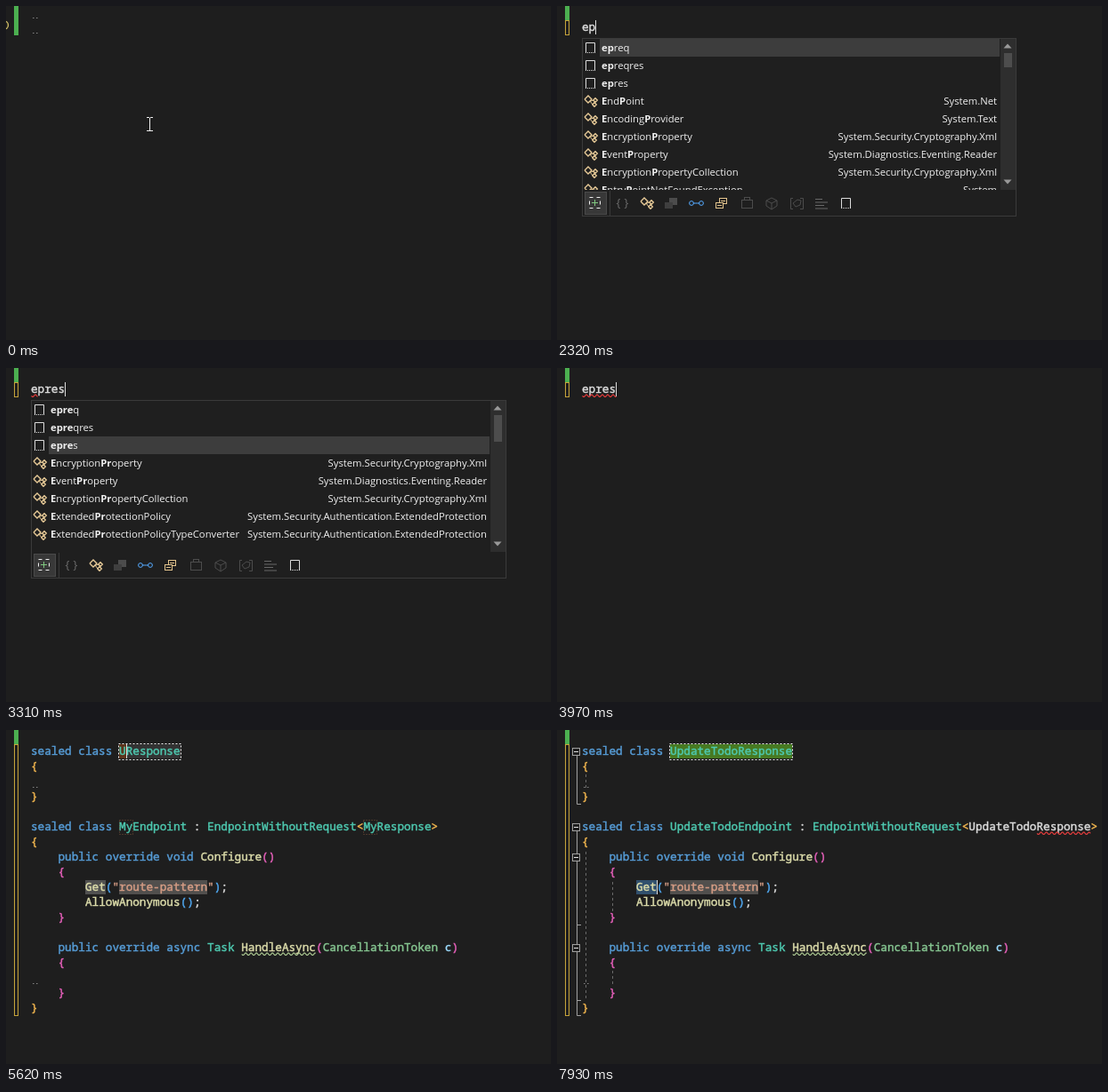
An HTML page with a canvas that plays this animation: 612 px wide and 376 px high, repeating every 8 s.

```html
<!DOCTYPE html>
<html lang="en">
<head>
<meta charset="utf-8">
<title>Snippet expansion</title>
<style>
html, body { margin: 0; width: 100%; height: 100%; overflow: hidden; background: #1e1e1e; }
canvas { display: block; }
</style>
</head>
<body>
<canvas id="stage" width="612" height="376"></canvas>
<script>
const ctx = document.getElementById('stage').getContext('2d');
const LEFT = 28, TOP = 16, ROW = 17, CHAR = 7.62;
const CODE_FONT = '12.7px "Noto Sans Mono", monospace';
const UI_FONT = '11.25px "Open Sans", sans-serif';
const COLORS = {
  k: '#569cd6', t: '#4ec9b0', m: '#dcdcaa', s: '#d69d85', w: '#dcdcdc',
  o: '#efb44e', p: '#e35fb8', b: '#4fa6ee', g: '#86c691', v: '#9cdcfe'
};
const colX = col => LEFT + col * CHAR;
const rowY = row => TOP + row * ROW;

function rect(x, y, w, h, color) {
  ctx.fillStyle = color;
  ctx.fillRect(x, y, w, h);
}

function frame(x, y, w, h, color, dash = []) {
  ctx.strokeStyle = color;
  ctx.lineWidth = 1;
  ctx.setLineDash(dash);
  ctx.strokeRect(x + .5, y + .5, w - 1, h - 1);
  ctx.setLineDash([]);
}

function line(points, color, dash = [], width = 1) {
  ctx.strokeStyle = color;
  ctx.lineWidth = width;
  ctx.setLineDash(dash);
  ctx.beginPath();
  points.forEach(([x, y]) => ctx.lineTo(x, y));
  ctx.stroke();
  ctx.setLineDash([]);
}

// Tokens are separated by "|"; the first letter of each picks its color.
// A thin stroke gives the text its medium weight.
function code(row, col, tokens) {
  ctx.font = CODE_FONT;
  ctx.textAlign = 'left';
  ctx.lineWidth = .45;
  for (const token of tokens.split('|')) {
    ctx.fillStyle = ctx.strokeStyle = COLORS[token[0]];
    const text = token.slice(2);
    ctx.fillText(text, colX(col), rowY(row) + 12);
    ctx.strokeText(text, colX(col), rowY(row) + 12);
    col += text.length;
  }
}

function caret(row, col) {
  rect(Math.round(colX(col)), rowY(row), 1, 16, '#dcdcdc');
}

function highlight(row, col, length, color) {
  rect(Math.round(colX(col)), rowY(row), Math.round(length * CHAR), ROW - 1, color);
}

function fieldOutline(row, col, length) {
  frame(Math.round(colX(col)), rowY(row), Math.round(length * CHAR) + 1, ROW, '#795038', [1, 2]);
}

function squiggle(row, col, length, color) {
  const points = [];
  for (let x = 0; x <= length * CHAR; x++)
    points.push([colX(col) + x + .5, rowY(row) + 15.3 + 1.3 * Math.sin(x * Math.PI / 3)]);
  line(points, color, [], 1.2);
}

function hintDots(row) {
  for (const x of [30, 34]) rect(x, rowY(row) + 14, 1.5, 1, '#858585');
}

function changeBar(savedTo, editedTo) {
  rect(9, 0, 5, savedTo, '#4caf50');
  if (editedTo) frame(9, savedTo, 5, editedTo - savedTo, '#c5a33b');
}

function ibeam(x, y) {
  rect(x, y + 1, 1, 15, '#eee');
  for (const edge of [y, y + 15]) {
    rect(x - 3, edge, 3, 1, '#eee');
    rect(x + 1, edge, 3, 1, '#eee');
  }
}

function snippetIcon(x, y) {
  const color = '#dcdcdc';
  line([[x - 4.5, y + 6], [x - 4.5, y - 5.5], [x + 5.5, y - 5.5], [x + 5.5, y + 6]], color);
  line([[x - 5, y + 5.5], [x + 6, y + 5.5]], color, [1, 1]);
}

function classIcon(x, y) {
  const diamond = (dx, dy, r) =>
    line([[x + dx - r, y + dy], [x + dx, y + dy - r], [x + dx + r, y + dy], [x + dx, y + dy + r], [x + dx - r, y + dy]],
      '#e8cb98', [], 1.4);
  diamond(-3, -2, 4);
  diamond(5, -1, 2.3);
  diamond(4, 4, 2.3);
  line([[x, y], [x + 3, y - 1]], '#e8cb98');
  line([[x - 1, y], [x + 2, y + 4]], '#e8cb98');
}

// Asterisks toggle bold.
function label(text, x, y) {
  ctx.textAlign = 'left';
  ctx.fillStyle = '#f0f0f0';
  text.split('*').forEach((part, i) => {
    ctx.font = (i % 2 ? 'bold ' : '') + UI_FONT;
    ctx.fillText(part, x, y);
    x += ctx.measureText(part).width;
  });
}

function triangle(x, y, dir) {
  ctx.fillStyle = '#999';
  ctx.beginPath();
  ctx.moveTo(x - 4.5, y - 2.5 * dir);
  ctx.lineTo(x + 4.5, y - 2.5 * dir);
  ctx.lineTo(x, y + 2.5 * dir);
  ctx.fill();
}

function toolbar() {
  const gray = '#4c4c4c', gold = '#e3c48d', blue = '#55aaff';
  rect(31, 209, 25, 26, '#383838');
  frame(31, 209, 25, 26, '#4a4a4a');
  frame(36, 215, 13, 13, '#eee', [4, 4]);
  rect(39, 221, 7, 1, '#7fc77f');
  rect(42, 218, 1, 7, '#7fc77f');
  rect(59, 208, 1, 28, '#3a3a3a');
  ctx.font = '13px "Noto Sans Mono", monospace';
  ctx.fillStyle = '#686868';
  ctx.fillText('{', 65, 226);
  ctx.fillText('}', 74, 226);
  classIcon(101, 222);
  rect(126, 216, 9, 8, gray);
  rect(121, 221, 9, 7, '#3f3f3f');
  line([[153, 222], [160, 222]], blue);
  for (const x of [151, 162]) {
    ctx.beginPath();
    ctx.arc(x, 222, 2.4, 0, 7);
    ctx.stroke();
  }
  frame(182, 216, 9, 7, gold);
  rect(178, 221, 9, 7, '#1f1f1f');
  frame(178, 221, 9, 7, gold);
  rect(184, 219, 5, 1, gold);
  rect(180, 224, 5, 1, gold);
  frame(207, 218, 13, 10, gray);
  frame(210, 215, 7, 4, gray);
  line([[241, 216], [247, 219], [247, 225], [241, 229], [235, 225], [235, 219], [241, 216]], gray);
  line([[235, 219], [241, 222], [247, 219]], gray);
  line([[241, 222], [241, 229]], gray);
  line([[265, 216.5], [262.5, 216.5], [262.5, 228.5], [265, 228.5]], gray);
  line([[273, 216.5], [276.5, 216.5], [276.5, 228.5], [273, 228.5]], gray);
  line([[265, 222], [270, 218], [274, 219], [273, 224], [268, 226], [265, 222]], gray);
  [8, 14, 10, 14].forEach((w, i) => rect(290, 217 + i * 3.5, w, 1, '#686868'));
  snippetIcon(324, 222);
}

const SECURITY = 'System.Security.';
const AUTH = SECURITY + 'Authentication.ExtendedProtection';
const XML = SECURITY + 'Cryptography.Xml';
const EARLY_LIST = [
  ['*ep*req'], ['*ep*reqres'], ['*ep*res'],
  ['*E*nd*P*oint', 'System.Net'],
  ['*E*ncoding*P*rovider', 'System.Text'],
  ['*E*ncryption*P*roperty', XML],
  ['*E*vent*P*roperty', 'System.Diagnostics.Eventing.Reader'],
  ['*E*ncryption*P*ropertyCollection', XML],
  ['*E*ntry*P*ointNotFoundException', 'System']
];
const FULL_LIST = [
  ['*epr*eq'], ['*epr*eqres'], ['*epr*es'],
  ['*E*ncoding*Pr*ovider', 'System.Text'],
  ['*E*ncryption*Pr*operty', XML],
  ['*E*vent*Pr*operty', 'System.Diagnostics.Eventing.Reader'],
  ['*E*ncryption*Pr*opertyCollection', XML],
  ['*E*xtended*Pr*otectionPolicy', AUTH],
  ['*E*xtended*Pr*otectionPolicyTypeConverter', AUTH]
];
const LATE_LIST = [
  ['*epre*q'], ['*epre*qres'], ['*epre*s'],
  ...FULL_LIST.slice(4)
];

function popup(items, right, selected, thumb) {
  rect(28, 36, right - 28, 201, '#1f1f1f');
  ctx.save();
  ctx.beginPath();
  ctx.rect(29, 37, right - 30, 170);
  ctx.clip();
  rect(48, 37 + selected * 20, right - 67, 20, '#3d3d3d');
  items.forEach(([name, space], i) => {
    const y = 47 + i * 20;
    (space ? classIcon : snippetIcon)(space ? 38 : 37, y);
    label(name, 50, y + 4);
    if (space) {
      ctx.font = UI_FONT;
      ctx.textAlign = 'right';
      ctx.fillText(space, right - 22, y + 4);
    }
  });
  rect(right - 18, 37, 17, 170, '#2e2e2e');
  triangle(right - 10, 45, -1);
  triangle(right - 10, 198, 1);
  rect(right - 14, 53, 9, thumb, '#4d4d4d');
  ctx.restore();
  ctx.textAlign = 'left';
  toolbar();
  frame(28, 36, right - 28, 201, '#3a3a3a');
}

function foldMargin(withLines) {
  const dash = [3, 3], guide = '#6a6a6a', outline = '#a0a0a0';
  for (const [x, from, to] of [[32.5, 50, 67], [32.5, 137, 302], [62.5, 171, 204], [62.5, 271, 288]])
    line([[x, from], [x, to]], guide, dash);
  if (withLines) {
    line([[22.5, 29], [22.5, 83.5], [27, 83.5]], outline);
    line([[22.5, 114], [22.5, 321.5], [27, 321.5]], outline);
    for (const y of [219.5, 304.5]) line([[22.5, y], [27, y]], outline);
  }
  for (const row of [0, 5, 7, 13]) {
    const y = rowY(row) + 4;
    rect(17, y, 9, 9, '#1e1e1e');
    frame(17, y, 9, 9, outline);
    rect(19, y + 4, 5, 1, '#e0e0e0');
  }
}

function expandedCode(t) {
  const done = t >= 7930, renaming = t >= 5620 && !done;
  const prefix = t < 5620 ? 'My' : t < 5950 ? 'U' : t < 6610 ? 'Upd' : t < 6940 ? 'Updat' : t < 7270 ? 'UpdateT' : 'UpdateTodo';
  const first = prefix + 'Response', linked = done ? 'UpdateTodo' : 'My';
  const argCol = 13 + linked.length + 8 + 3 + 23;
  changeBar(16, 322);

  if (done) highlight(0, 13, first.length, '#477a22');
  else if (renaming) {
    highlight(0, 13, first.length, '#333');
    highlight(0, 13, prefix.length, '#5c341c');
  } else if (t >= 4960) {
    highlight(0, 13, first.length, '#3a3a3a');
    highlight(5, argCol, 10, '#3a3a3a');
    highlight(0, 13, 2, '#264f78');
  }
  highlight(9, 8, 3, done ? '#31506d' : '#505050');
  highlight(9, 13, 13, '#514f4d');
  if (t >= 5950) foldMargin(t >= 6610);
  if (t >= 5620) [2, 15].forEach(hintDots);

  code(0, 0, 'k:sealed class |t:' + first);
  code(1, 0, 'o:{');
  code(3, 0, 'o:}');
  code(5, 0, `k:sealed class |t:${linked}Endpoint|w: : |t:EndpointWithoutRequest|o:<|${t < 5950 ? 't' : 'w'}:${linked}Response|o:>`);
  code(6, 0, 'o:{');
  code(7, 4, 'k:public override void |m:Configure|p:()');
  code(8, 4, 'p:{');
  code(9, 8, 'm:Get|b:(|s:"route-pattern"|b:)|w:;');
  code(10, 8, 'm:AllowAnonymous|b:()|w:;');
  code(11, 4, 'p:}');
  code(13, 4, 'k:public override async |t:Task |m:HandleAsync|p:(|g:CancellationToken |v:c|p:)');
  code(14, 4, 'p:{');
  code(16, 4, 'p:}');
  code(17, 0, 'o:}');

  if (t >= 4960) squiggle(13, 31, 11, '#a9c58f');
  if (done) squiggle(5, argCol + 10, 8, '#e03c3c');
  else if (t >= 7270) squiggle(5, argCol, 10, '#e03c3c');
  if (!done) {
    fieldOutline(5, 13, 2);
    fieldOutline(5, argCol, 2);
  }
  if (t < 5620) fieldOutline(0, 13, 2);
  else frame(126, 15, Math.round(first.length * CHAR) + 2, 19, '#f0f0f0', [2, 2]);

  if (done) caret(9, 11);
  else if (t < 4960) caret(17, 1);
  else caret(0, 13 + prefix.length);
}

function typing(t) {
  const typed = t < 1990 ? '' : t < 2320 ? 'e' : t < 2980 ? 'ep' : t < 3310 ? 'epre' : 'epres';
  changeBar(typed ? 16 : 33, typed ? 33 : 0);
  if (t < 2320) hintDots(-1);
  if (t < 660) {
    hintDots(0);
    ctx.strokeStyle = '#d3bf68';
    ctx.lineWidth = 1.3;
    ctx.beginPath();
    ctx.arc(-2, 21.5, 4.5, 0, 7);
    ctx.stroke();
  }
  if (t < 330) ibeam(161, 125);
  code(0, 0, 'w:' + typed);
  if (t >= 330 && !(t >= 660 && t < 990)) caret(0, typed.length);
  if (t >= 2980) squiggle(0, 0, t < 3970 ? 1 : 5, '#e03c3c');
  if (t >= 2320 && t < 2980) popup(EARLY_LIST, 516, 0, 16);
  else if (t >= 2980 && t < 3310) popup(FULL_LIST, 562, 2, 16);
  else if (t >= 3310 && t < 3970) popup(LATE_LIST, 562, 2, 30);
}

function draw(now) {
  const t = now % 8000;
  rect(0, 0, 612, 376, '#1e1e1e');
  if (t < 4630) typing(t);
  else expandedCode(t);
}

const start = performance.now();
function tick() {
  draw(performance.now() - start);
  requestAnimationFrame(tick);
}
tick();
</script>
</body>
</html>
```
